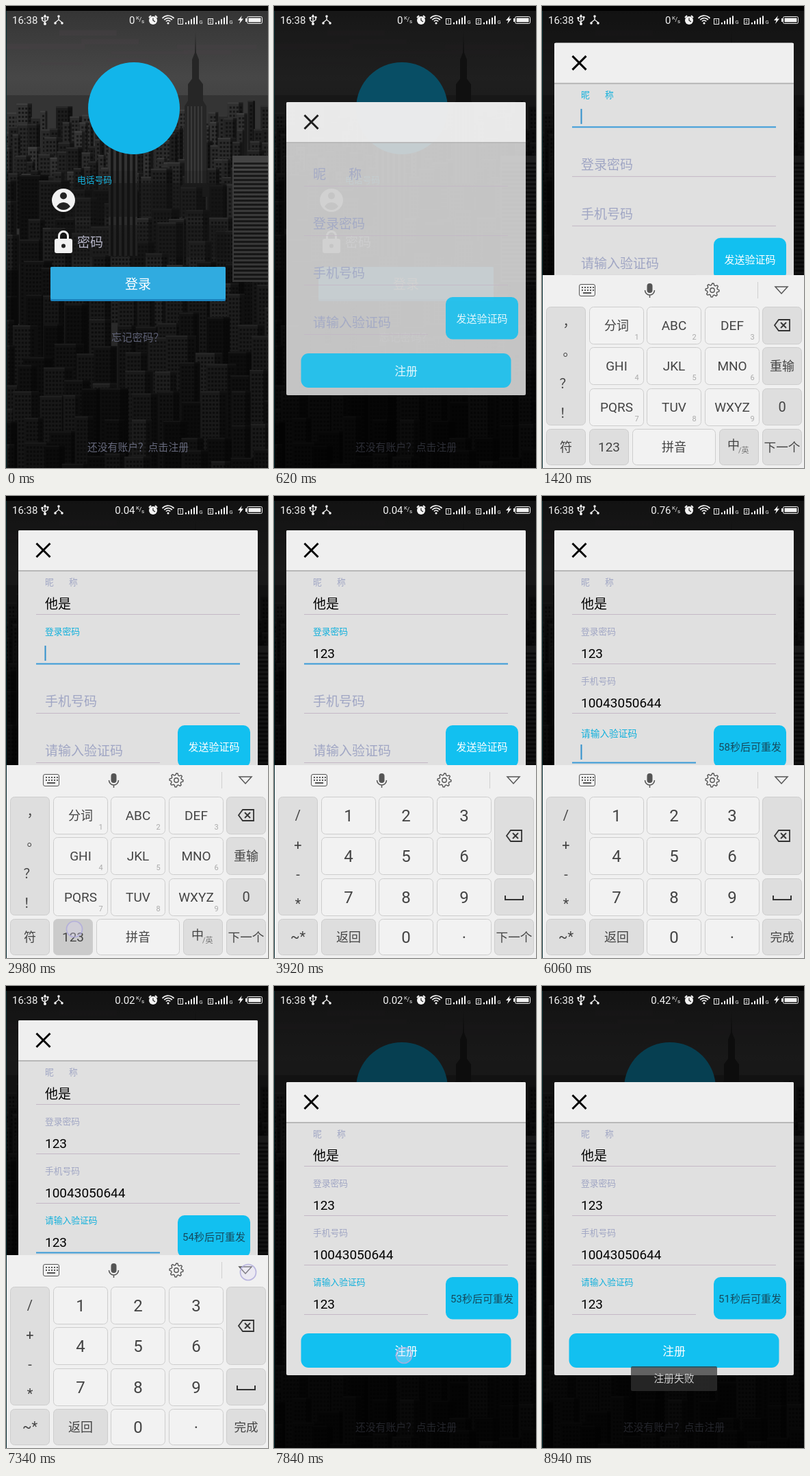
These frames come from a looping animation (383 by 673 pixels, 9.04 s). An HTML page with a canvas:

```html
<!DOCTYPE html>
<html lang="zh-CN">
<head>
<meta charset="utf-8">
<style>
html, body { margin: 0; width: 100%; height: 100%; overflow: hidden; background: #000; }
canvas { display: block; }
</style>
</head>
<body>
<canvas id="stage" width="383" height="673"></canvas>
<script>
const LOOP = 9040, W = 383, H = 673;
const BLUE = '#12c0f0', LABEL = '#10b0dc', MUTED = '#a0a6c4', KEY_INK = '#444';
const PHONE = '10043050644';
let ctx;

// ---------- drawing helpers ----------
function rect(x, y, w, h, color) {
  ctx.fillStyle = color;
  ctx.fillRect(x, y, w, h);
}
function round(x, y, w, h, r, fill, stroke) {
  ctx.beginPath();
  ctx.roundRect(x, y, w, h, r);
  paint(fill, stroke, 1);
}
function circle(x, y, r, fill, stroke, width = 1) {
  ctx.beginPath();
  ctx.arc(x, y, r, 0, 7);
  paint(fill, stroke, width);
}
function path(d, x, y, fill, stroke, width = 1.5) {
  ctx.save();
  ctx.translate(x, y);
  const p = new Path2D(d);
  if (fill) { ctx.fillStyle = fill; ctx.fill(p, 'evenodd'); }
  if (stroke) { ctx.strokeStyle = stroke; ctx.lineWidth = width; ctx.stroke(p); }
  ctx.restore();
}
function paint(fill, stroke, width) {
  if (fill) { ctx.fillStyle = fill; ctx.fill(); }
  if (stroke) { ctx.strokeStyle = stroke; ctx.lineWidth = width; ctx.stroke(); }
}
function text(s, x, y, size, color, align = 'left') {
  ctx.font = `${size}px Roboto, "Noto Sans CJK SC", "Noto Sans CJK", sans-serif`;
  ctx.textAlign = align;
  ctx.fillStyle = color;
  ctx.fillText(s, x, y + size * 0.37);
}

// ---------- timing helpers ----------
function ease(t, start, duration) {
  const p = Math.min(1, Math.max(0, (t - start) / duration));
  return 1 - (1 - p) ** 2;
}
const passed = (t, times) => times.filter(s => t >= s).length;

// ---------- login screen ----------
function drawCity() {
  let seed = 11;
  const rand = (a, b) => {
    seed = (seed * 16807) % 2147483647;
    return a + (b - a) * seed / 2147483647;
  };
  const gray = (v, a = 1) => `rgba(${v},${v},${v},${a})`;
  const sky = ctx.createLinearGradient(0, 7, 0, 200);
  sky.addColorStop(0, '#353535');
  sky.addColorStop(0.5, '#474747');
  sky.addColorStop(1, '#3a3a3a');
  rect(0, 0, W, H, sky);
  for (let i = 0; i < 9; i++) rect(rand(-60, 300), rand(30, 95), rand(60, 170), rand(3, 9), 'rgba(70,64,68,.5)');
  rect(0, 130, W, 70, '#343434');

  const building = (x, y, w, h, v) => {
    rect(x, y, w, h, gray(v));
    rect(x, y, w, 2, gray(v + 14));
    rect(x + w * 0.72, y, w * 0.28, h, gray(8, 0.55));
    for (let wy = y + 6; wy < y + h; wy += 6)
      for (let wx = x + 3; wx < x + w - 3; wx += 5) rect(wx, wy, 3, 3, gray(10, 0.65));
  };
  for (let y = 148; y < 250; y += 22)
    for (let x = -8; x < W; x += rand(9, 26))
      building(x, y + rand(-10, 14), rand(10, 26), 80, rand(28, 52) | 0);

  // tall tower with a spire
  path('M0 0L1 30L5 40L5 68L11 76L11 100L16 108L16 220L22 225L22 240L-22 240L-22 225L-16 220L-16 108L-11 100L-11 76L-5 68L-5 40L-1 30Z', 277, 38, '#262626');
  for (let x = 265; x < 290; x += 5) rect(x, 146, 2, 112, '#3a3a3a');

  for (let y = 255; y < H; y += 40)
    for (let x = -15; x < W; x += rand(24, 48))
      building(x, y + rand(-22, 18), rand(24, 46), 130, rand(18, 48) | 0);

  rect(150, 192, 42, 172, '#333');
  for (let x = 153; x < 190; x += 8) rect(x, 200, 4, 164, '#151515');
  rect(331, 218, 52, 184, '#444');
  for (let y = 228; y < 400; y += 6) rect(333, y, 50, 3, '#1c1c1c');
  const shade = ctx.createLinearGradient(0, 240, 0, H);
  shade.addColorStop(0, 'rgba(0,0,0,.1)');
  shade.addColorStop(1, 'rgba(0,0,0,.45)');
  rect(0, 240, W, H, shade);
}

function drawLogin() {
  drawCity();
  circle(187, 149, 67, '#12b5ea');
  rect(65, 258, 256, 49, 'rgba(20,20,20,.5)');
  rect(65, 319, 256, 47, 'rgba(20,20,20,.4)');
  text('电话号码', 104, 253, 12.75, '#14b4e0');
  circle(84, 283, 17, '#f2f2f2');
  circle(84, 276.5, 5, '#222');
  path('M-10 9Q-6 3 0 3T10 9Q6 14 0 14T-10 9Z', 84, 283, '#222');
  round(71, 339, 26, 21, 3, '#f2f2f2');
  path('M-6.5 0V-5A6.5 6.5 0 0 1 6.5 -5V0', 84, 340, null, '#f2f2f2', 3);
  circle(84, 349.5, 3, '#222');
  text('密码', 104, 344, 19, '#b4b4c6');
  round(65, 380, 256, 50, 2, '#1a82bd');
  round(65, 380, 256, 47, 2, '#30abe0');
  text('登录', 193, 405, 19, '#fff', 'center');
  text('忘记密码？', 154, 482, 15.3, '#5d6074');
  text('还没有账户？点击注册', 119, 643, 14.8, '#66697c');
}

// ---------- status bar ----------
function drawStatus(t) {
  const white = '#f4f4f4';
  text('16:38', 9, 20.5, 15, white);
  path('M0 -7V7M-4 -2V1L0 4M4 -3V0L0 3', 57, 20, null, white, 1.4);
  path('M0 -8L2.5 -4H-2.5Z', 57, 20, white);
  circle(57, 26, 2, white);
  rect(51.5, 16, 3, 3, white);
  circle(61, 16.5, 1.7, white);
  path('M0 -5V0L-5 4M0 0L5 4', 77, 20, null, white, 1.3);
  for (const [x, y] of [[77, 15], [72, 25], [82, 25]]) circle(x, y, 1.8, white);

  const speed = ['0', '0.04', '0.76', '0.02', '0.42'][passed(t, [2540, 5620, 6640, 8040])];
  text(speed, 188.5, 20.5, 15, white, 'right');
  text('K', 190, 17.5, 8, white);
  text('/', 194.5, 20, 9, white);
  text('s', 198, 22.5, 8, white);

  circle(215, 21, 6, white);
  path('M-6 -4L-3 -7M6 -4L3 -7', 215, 21, null, white, 2);
  path('M0 -3.5V0L3 2', 215, 21, null, '#222', 1.2);
  for (const r of [4, 7.5, 11]) {
    ctx.beginPath();
    ctx.arc(237, 25, r, -Math.PI * 0.78, -Math.PI * 0.22);
    paint(null, white, 1.7);
  }
  circle(237, 25, 1.6, white);
  [251, 295].forEach((x, sim) => {
    ctx.strokeStyle = white;
    ctx.lineWidth = 1;
    ctx.strokeRect(x + 0.5, 18.5, 7, 8);
    text(sim + 1, x + 4, 22.5, 7, white, 'center');
    for (let i = 0; i < 5; i++) rect(x + 11 + i * 4, 24 - i * 2.4, 2, 2.5 + i * 2.4, white);
    text('G', x + 31.5, 23.5, 7.5, white);
  });
  path('M2 -6L-4 1H-0.5L-2 6L4 -1.5H0.5Z', 343, 20, white);
  round(352.5, 15.5, 22, 10, 2, null, white);
  rect(354.5, 17.5, 18, 6, white);
  rect(350, 18, 2, 5, white);
}

// ---------- registration dialog ----------
const FIELDS = [
  { hint: '昵       称', focus: 1320 },
  { hint: '登录密码', focus: 2640 },
  { hint: '手机号码', focus: 4120 },
  { hint: '请输入验证码', focus: 6000 }
];
const phoneCount = t => t < 4280 ? 0 : Math.min(11, Math.floor((t - 4280) / 90) + 1);
const values = t => [
  t >= 2540 ? '他是' : '',
  '123'.slice(0, passed(t, [3380, 3580, 3780])),
  PHONE.slice(0, phoneCount(t)),
  '123'.slice(0, passed(t, [6360, 6560, 6760]))
];

function drawDialog(t, top) {
  const count = phoneCount(t), invalid = count > 0 && count < 11, push = invalid ? 25 : 0;
  const typed = values(t), active = passed(t, FIELDS.map(f => f.focus)) - 1;
  ctx.save();
  ctx.translate(0, top);
  round(18, 0, 350, 427, 2, '#e0e0e0');
  round(18, 0, 350, 58, [2, 2, 0, 0], '#efefef');
  rect(18, 58, 350, 2, '#b8b8b8');
  path('M-10 -10L10 10M10 -10L-10 10', 54.5, 29, null, '#000', 3);

  FIELDS.forEach((field, i) => {
    const y = 72 * i + (i === 3 ? push : 0), right = i === 3 ? 225 : 342;
    const focused = i === active, editing = focused && t < 7440;
    const lift = ease(t, field.focus, 100);
    text(field.hint, 57, y + 105 - 30 * lift, 19 - 6.25 * lift, focused ? LABEL : MUTED);
    text(typed[i], 57, y + 106.5, 19, '#000');
    if (editing) rect(44, y + 121.5, right - 44, 2, i === 2 && invalid ? '#e0502c' : '#3a9bd8');
    else rect(44, y + 122, right - 44, 1, '#c4b8c6');
    const caretOn = i === 2 || t - field.focus < 500 || (t >= 2900 && t < 3400);
    if (editing && caretOn) {
      ctx.font = '19px Roboto, sans-serif';
      rect(56.5 + (typed[i] ? ctx.measureText(typed[i]).width : 0), y + 96, 2, 22, '#3090cc');
    }
  });
  if (invalid) text('手机号码格式不正确', 57, 282, 12.75, '#c8341c');

  const sent = t >= 5420;
  const seconds = 60 - passed(t, [5720, 6020, 6360, 6640, 6940, 7240, 7740, 8140, 8640]);
  round(251, 284 + push, 106, 61.5, 10, BLUE);
  text(sent ? seconds + '秒后可重发' : '发送验证码', 304, 315.5 + push, 15,
    sent || invalid ? '#15495c' : '#fff', 'center');
  round(39.5, 366 + push, 307, 50, 11, BLUE);
  text('注册', 193, 391.5 + push, 16.8, '#fff', 'center');
  ctx.restore();
}

// ---------- keyboard ----------
const COLS = [6, 69, 153, 238, 322], ROWS = [438, 497, 557, 616];
const LETTERS = ['分词', 'ABC', 'DEF', 'GHI', 'JKL', 'MNO', 'PQRS', 'TUV', 'WXYZ'];

function key(label, x, y, w, h, fill = '#f2f2f2', size = 18) {
  round(x + 0.5, y + 0.5, w - 1, h - 1, 6, fill, '#cdcdcd');
  text(label, x + w / 2, y + h / 2 - 0.5, size, KEY_INK, 'center');
}

function drawKeyboard(t, offset) {
  const numeric = t >= 3080, dark = '#dedede';
  ctx.save();
  ctx.translate(0, offset);
  rect(0, 392, W, 281, '#f0f0f0');

  round(54.5, 405.5, 23, 17, 2.5, null, '#555');
  for (let y = 409; y < 416; y += 4)
    for (let x = 58; x < 75; x += 4) rect(x, y, 2, 2, '#555');
  rect(60, 417, 12, 2, '#555');
  round(153.5, 404, 8, 14, 4, '#555');
  path('M-7 0A7 7 0 0 0 7 0M0 7V11', 157.5, 414, null, '#555');
  circle(249, 414, 3.2, null, '#555', 1.4);
  let gear = '';
  for (let i = 0; i < 32; i++) {
    const r = i % 4 < 2 ? 10 : 7.5, a = i * Math.PI / 16;
    gear += (i ? 'L' : 'M') + r * Math.cos(a) + ' ' + r * Math.sin(a);
  }
  path(gear + 'Z', 249, 414, null, '#555', 1.4);
  rect(315, 402, 1, 24, '#d0d0d0');
  path('M-9 -5H9L0 5Z', 350, 414, null, '#555');

  round(6.5, 438.5, 57, 172, 6, dark, '#cdcdcd');
  [...(numeric ? '/+-*' : '，。？！')].forEach((c, i) => {
    const shift = numeric ? 0 : 'x，。'.indexOf(c) > 0 ? 5 : 0;
    text(c, 35 + shift, 465 + i * 42.7 - shift, numeric ? 20 : 19, KEY_INK, 'center');
  });
  LETTERS.forEach((label, i) => {
    const x = COLS[1 + i % 3], y = ROWS[i / 3 | 0];
    key(numeric ? i + 1 : label, x, y, 80, 55, '#f2f2f2', numeric ? 24 : i ? 19 : 18);
    if (!numeric) text(i + 1, x + 69.5, y + 44, 11, '#aaa', 'center');
  });

  key('', 322, 438, 58, numeric ? 114 : 55, dark);
  const delY = numeric ? 495 : 465;
  path('M-11 0L-5 -8H11V8H-5ZM-2 -4L6 4M6 -4L-2 4', 351, delY, null, '#333', 1.8);
  if (numeric) {
    key('', 322, 557, 58, 54, dark);
    path('M-13 -3V3H13V-3', 351, 585, null, '#333', 2);
    key('~*', 6, 616, 58, 53, dark, 20);
    key('返回', 69, 616, 80, 53, dark);
    key('0', 153, 616, 80, 53, '#f2f2f2', 24);
    key('·', 238, 616, 80, 53, '#f2f2f2', 24);
  } else {
    key('重输', 322, 497, 58, 55, dark);
    key('0', 322, 557, 58, 54, dark, 20);
    key('符', 6, 616, 58, 53, dark);
    key('123', 69, 616, 58, 53, t >= 2940 ? '#cbcbcb' : dark, 19);
    key('拼音', 132, 616, 122, 53);
    key('', 259, 616, 58, 53, dark);
    text('中', 271, 639, 18, KEY_INK);
    text('/英', 287, 647, 11, '#777');
  }
  key(t >= 6000 ? '完成' : '下一个', 322, 616, 58, 53, dark, 17.6);
  ctx.restore();
}

// ---------- touches: start, end, x, y ----------
const digitSpot = d => d === 0 ? [189, 650] : [COLS[1 + (d - 1) % 3] + 34, ROWS[(d - 1) / 3 | 0] + 37];
const TOUCHES = [
  [400, 520, 237, 643], [1320, 1400, 140, 245],
  [1620, 1720, ...digitSpot(8)], [1740, 1840, ...digitSpot(2)], [1860, 1960, ...digitSpot(7)],
  [1980, 2070, ...digitSpot(4)], [2120, 2240, ...digitSpot(4)],
  [2640, 2740, 140, 230], [2940, 3080, 100, 631],
  [3380, 3480, ...digitSpot(1)], [3580, 3680, ...digitSpot(2)], [3780, 3880, ...digitSpot(3)],
  [4020, 4120, 345, 637], [5420, 5520, 304, 370], [5900, 6000, 140, 375],
  [6360, 6460, ...digitSpot(1)], [6560, 6660, ...digitSpot(2)], [6760, 6860, ...digitSpot(3)],
  [7240, 7440, 354, 417], [7840, 8040, 190, 538]
];

function drawTouch(t) {
  let spot = TOUCHES.find(([from, to]) => t >= from && t < to)?.slice(2);
  const count = phoneCount(t);
  if (t >= 4280 && count < 11) spot = digitSpot(+PHONE[count]);
  if (spot) circle(...spot, 11.5, 'rgba(225,220,250,.3)', 'rgba(175,170,220,.85)', 1.7);
}

// ---------- scene ----------
const stage = document.getElementById('stage').getContext('2d');
const login = document.createElement('canvas');
login.width = W;
login.height = H;
ctx = login.getContext('2d');
drawLogin();
ctx = stage;

function draw(now) {
  const t = now % LOOP;
  ctx.drawImage(login, 0, 0);
  const shown = ease(t, 480, 220);
  rect(0, 0, W, H, `rgba(0,0,0,${0.65 * shown})`);
  drawStatus(t);
  if (shown) {
    ctx.globalAlpha = shown;
    drawDialog(t, 140 - 90 * (ease(t, 1310, 140) - ease(t, 7400, 140)));
    ctx.globalAlpha = 1;
  }
  const raised = ease(t, 1310, 110) - ease(t, 7400, 140);
  if (raised > 0) drawKeyboard(t, 281 * (1 - raised));
  if (t >= 8940) {
    round(130, 554, 126, 36, 2, 'rgba(50,50,50,.72)');
    text('注册失败', 193, 572, 14.8, '#d0d0d0', 'center');
  }
  drawTouch(t);
  rect(0, 0, W, 7, '#000');
  rect(0, 7, 1, H, '#062c30');
  requestAnimationFrame(draw);
}
requestAnimationFrame(draw);
</script>
</body>
</html>
```
